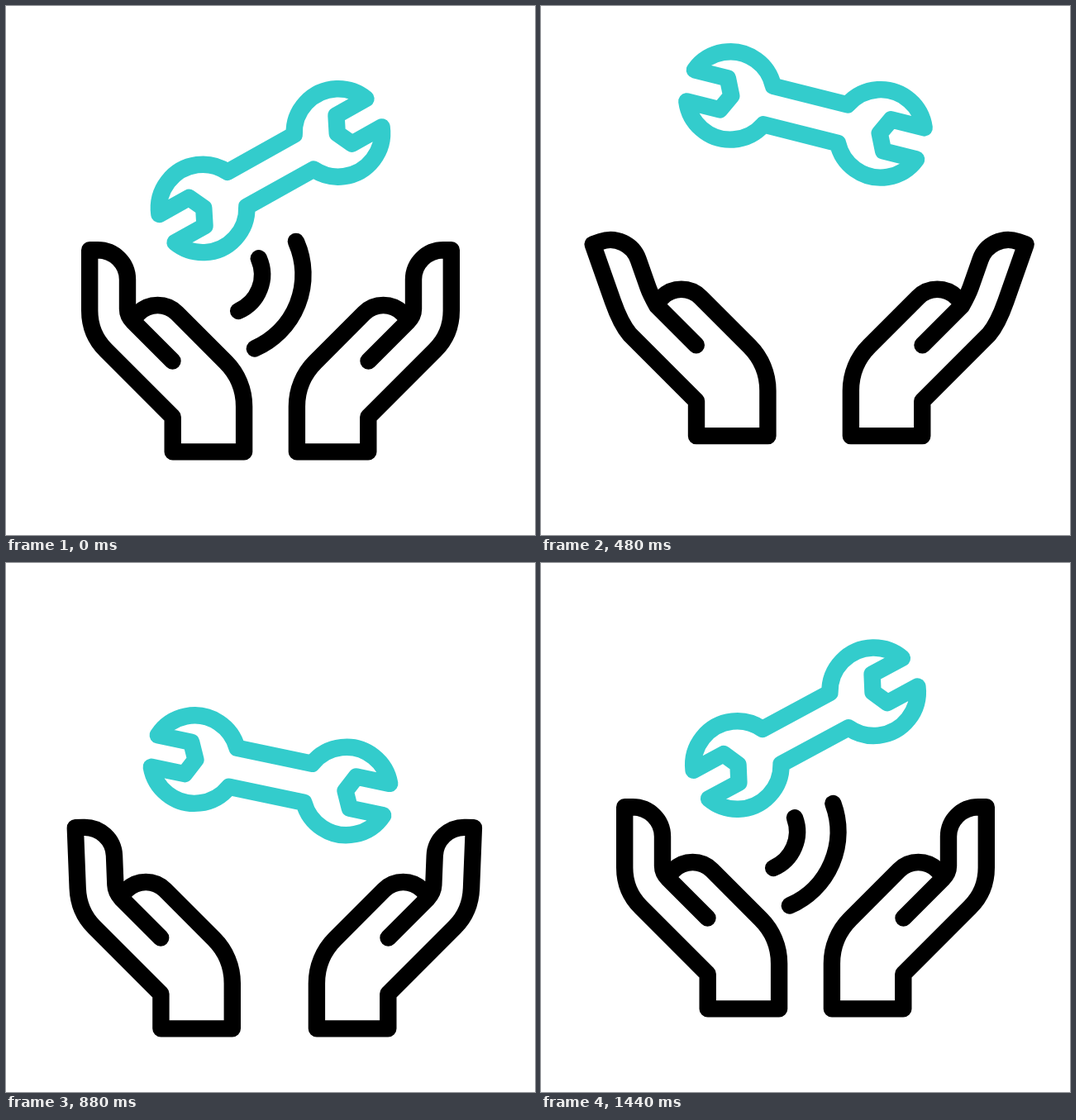
Write an HTML page with a canvas that moves like this. It is 640 px wide and 640 px high and loops after 1.48 s.

```html
<!DOCTYPE html>
<html lang="en">
<head>
<meta charset="utf-8">
<title>Hands tossing a wrench</title>
<style>
html, body { margin: 0; width: 100%; height: 100%; overflow: hidden; background: #fff; }
canvas { display: block; }
</style>
</head>
<body>
<canvas id="stage" width="640" height="640"></canvas>
<script>
const ctx = document.getElementById('stage').getContext('2d');
const LOOP = 1480, STEP = 40, RAD = Math.PI / 180;

const smooth = u => u * u * (3 - 2 * u);
const out = n => u => 1 - (1 - u) ** n;

// A track is a start value followed by moves: [begin, end, value, ease].
function track(t, value, ...moves) {
  for (const [begin, end, target, ease] of moves) {
    if (t <= begin) break;
    value += (target - value) * ease(Math.min(1, (t - begin) / (end - begin)));
  }
  return value;
}

function pose(t) {
  return {
    wrenchY: track(t, 199.2, [0, 520, 130.8, out(1.85)], [520, 920, 258.3, out(1.93)], [940, 1480, 199.2, smooth]),
    tilt: track(t, -29.2, [0, 520, 14.8, out(1.65)], [520, 920, 11.8, out(3)], [1040, 1480, -29.2, smooth]),
    spread: track(t, 0, [200, 520, 1, smooth], [920, 1240, 0, smooth]),
    handY: track(t, 0, [0, 520, -19.4, out(1.85)], [520, 920, 26, out(1.35)], [920, 1360, 0, smooth]),
    bend: track(t, 0, [200, 520, 24, u => u ** 1.6], [520, 920, 2.2, out(2.6)],
      [920, 1080, 16.5, smooth], [1080, 1280, 0, smooth]),
    trimStart: t < 1160 ? track(t, 0, [0, 280, 1, smooth]) : 0,
    trimEnd: t < 1160 ? 1 : track(t, 0, [1160, 1480, 1, smooth])
  };
}

// Rotates a point of the fingers around their base.
function bender(angle) {
  const c = Math.cos(angle * RAD), s = Math.sin(angle * RAD), px = 124.6, py = 374.2;
  return (x, y) => [px + (x - px) * c + (y - py) * s, py - (x - px) * s + (y - py) * c];
}

function hand(dx, dy, bend, mirrored) {
  const finger = bender(bend);
  ctx.save();
  if (mirrored) {
    ctx.translate(640, 0);
    ctx.scale(-1, 1);
  }
  ctx.translate(dx, dy);
  ctx.beginPath();
  ctx.moveTo(201.5, 429.5);
  ctx.lineTo(154, 382);
  ctx.quadraticCurveTo(...finger(147, 375), ...finger(147, 366.5));
  ctx.lineTo(...finger(147, 331));
  ctx.bezierCurveTo(...finger(147, 311.3), ...finger(130.9, 295.3), ...finger(111, 295.3));
  ctx.lineTo(...finger(101.2, 295.3));
  ctx.lineTo(...finger(101.2, 368.5));
  ctx.quadraticCurveTo(...finger(101.2, 397), 121, 416.5);
  ctx.lineTo(201.7, 497.2);
  ctx.lineTo(201.7, 539.4);
  ctx.lineTo(288.1, 539.4);
  ctx.arcTo(288.1, 453, 206.8, 371.7, 76);
  ctx.arc(183.5, 395, 33, -45 * RAD, -148 * RAD, true);
  ctx.stroke();
  ctx.restore();
}

function wrench(y, tilt) {
  const head = 93.8, r = 53.2, jaw = 19.6, shaft = 24;
  const tip = Math.asin(jaw / r), neck = Math.asin(shaft / r);
  ctx.save();
  ctx.translate(320, y);
  ctx.rotate(tilt * RAD);
  ctx.beginPath();
  for (let side = 0; side < 2; side++) {
    ctx.arc(head, 0, r, Math.PI + neck, 2 * Math.PI - tip);
    ctx.lineTo(102, -jaw);
    ctx.lineTo(92.5, 0);
    ctx.lineTo(102, jaw);
    ctx.arc(head, 0, r, tip, Math.PI - neck);
    ctx.rotate(Math.PI);
  }
  ctx.closePath();
  ctx.stroke();
  ctx.restore();
}

function swoosh(start, end) {
  if (end - start < 0.001) return;
  const angle = u => (66.5 - 90.8 * u) * RAD;
  for (const r of [48, 97.5]) {
    ctx.beginPath();
    ctx.arc(262, 325, r, angle(start), angle(end), true);
    ctx.stroke();
  }
}

function draw(t) {
  const p = pose(t);
  ctx.fillStyle = '#fff';
  ctx.fillRect(0, 0, 640, 640);
  ctx.lineWidth = 20.4;
  ctx.lineCap = ctx.lineJoin = 'round';
  ctx.strokeStyle = '#000';
  hand(-14.3 * p.spread, p.handY, p.bend, false);
  hand(-24 * p.spread, p.handY, p.bend, true);
  swoosh(p.trimStart, p.trimEnd);
  ctx.strokeStyle = '#33cccc';
  wrench(p.wrenchY, p.tilt);
}

const origin = performance.now();
function tick() {
  const t = (performance.now() - origin) % LOOP;
  draw(Math.floor(t / STEP) * STEP);
  requestAnimationFrame(tick);
}
tick();
</script>
</body>
</html>
```
